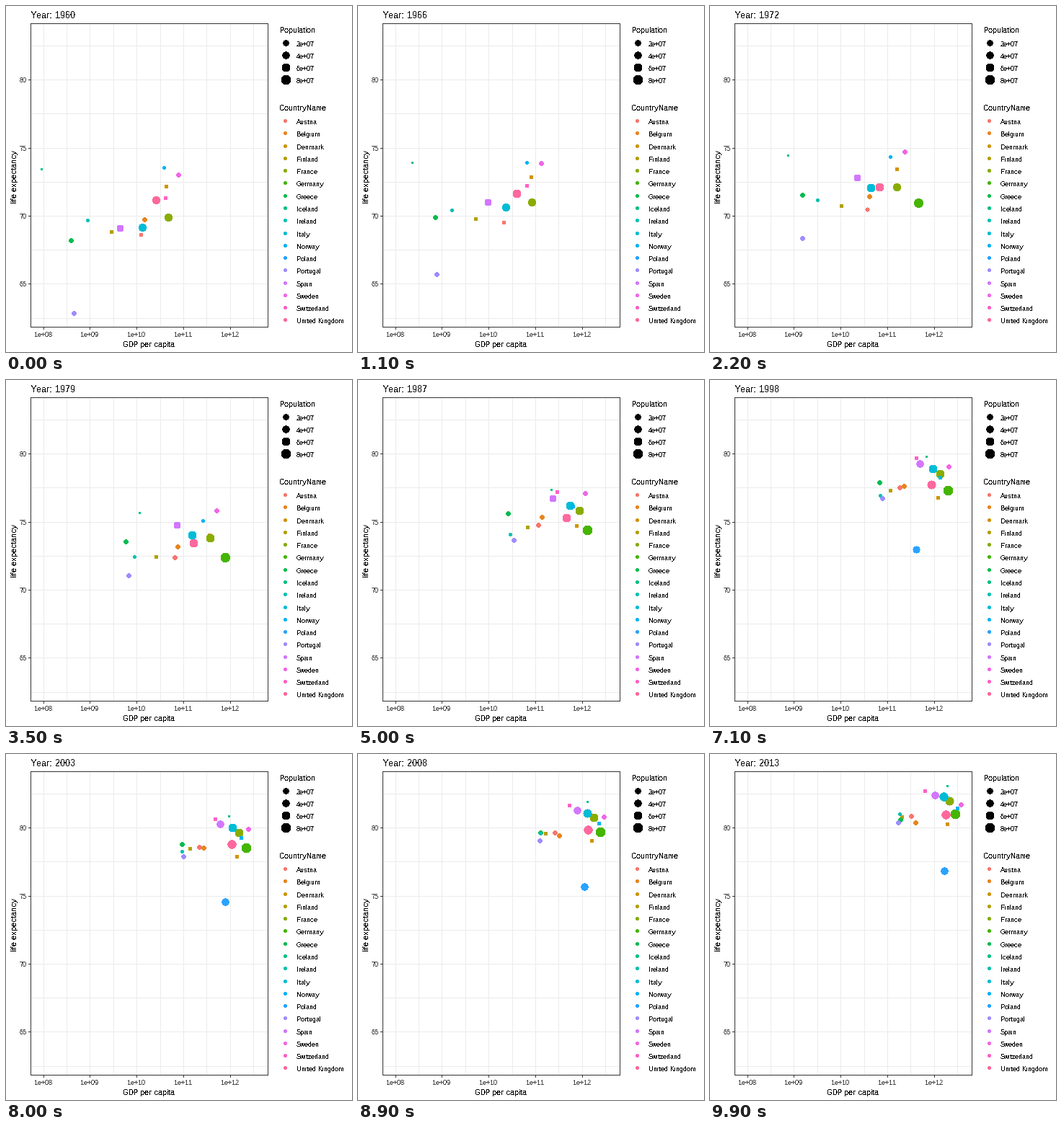
These frames come from a looping animation (480 by 480 pixels, 10000 ms). A matplotlib script:

```python
import numpy as np
import matplotlib.pyplot as plt
from matplotlib.animation import FuncAnimation
from matplotlib.patches import Circle, Rectangle

plt.rcParams.update({
    "font.family": "Liberation Sans",
    "text.hinting": "native",
    "text.hinting_factor": 1,
    "text.antialiased": False,
})

STAGE, DPI = 480, 80
FRAMES, INTERVAL = 100, 100
FIRST, LAST = 1960, 2013
STOPS = np.array([0, 22, 50, 99]) / 99  # when a path passes its waypoints
LEFT, TOP, RIGHT, BOTTOM = 34, 24, 363, 445
GRID, DARK, GREY = "#EBEBEB", "#333333", "#4D4D4D"

fig = plt.figure(figsize=(STAGE / DPI, STAGE / DPI), dpi=DPI, facecolor="white")
ax = fig.add_axes([0, 0, 1, 1])
ax.set_xlim(0, STAGE)
ax.set_ylim(STAGE, 0)
ax.axis("off")


def hcl(hue, chroma=100, lum=65):
    """Polar LUV colour to clipped sRGB."""
    h = np.radians(hue)
    y = ((lum + 16) / 116) ** 3
    u = chroma * np.cos(h) / (13 * lum) + 0.1978398
    v = chroma * np.sin(h) / (13 * lum) + 0.4683363
    x = 9 * y * u / (4 * v)
    z = -x / 3 - 5 * y + 3 * y / v
    rgb = np.clip([3.240479 * x - 1.537150 * y - 0.498535 * z,
                   -0.969256 * x + 1.875992 * y + 0.041556 * z,
                   0.055648 * x - 0.204043 * y + 1.057311 * z], 0, 1)
    return tuple(np.where(rgb > 0.00304, 1.055 * rgb ** (1 / 2.4) - 0.055, 12.92 * rgb))


def label(x, y, s, px, color="black", **kw):
    return ax.text(x, y, s, fontsize=px * 72 / DPI, color=color, zorder=8, **kw)


def bar(x, y, w, h, color, z=1):
    ax.add_patch(Rectangle((x, y), w, h, facecolor=color, lw=0,
                           antialiased=False, zorder=z))


def pixel(x, y):
    return np.floor(x) + 0.5, np.floor(y) + 0.5


def dot(x, y, r, color):
    return ax.add_patch(Circle(pixel(x, y), r, facecolor=color, lw=0,
                               antialiased=False, zorder=4))


def pop_radius(millions):
    """Dot area grows with population."""
    size = 1 + 5 * np.sqrt(np.clip(millions / 82.5, 0, 1))
    return np.maximum(0.375 * (size * 2.845 + 0.945) - 0.5, 1.1)


def smooth(t, p, at):
    """Monotone cubic through the points (t, p)."""
    h, s = np.diff(t), np.diff(p) / np.diff(t)
    a, b = 2 * h[1:] + h[:-1], h[1:] + 2 * h[:-1]
    same = s[:-1] * s[1:] > 0
    inner = np.zeros(len(same))
    inner[same] = (a + b)[same] / (a[same] / s[:-1][same] + b[same] / s[1:][same])
    m = np.concatenate([s[:1], inner, s[-1:]])
    i = np.clip(np.searchsorted(t, at, side="right") - 1, 0, len(s) - 1)
    q = np.clip((at - t[i]) / h[i], 0, 1)
    return (p[i] + (p[i + 1] - p[i]) * q * q * (3 - 2 * q)
            + q * (1 - q) * h[i] * ((1 - q) * m[i] - q * m[i + 1]))


def frame_of(year):
    return round((year - FIRST) * (FRAMES - 1) / (LAST - FIRST))


# Panel, grid and axes
for i in range(10):
    x = int(52 + 32.4 * i)
    bar(x, TOP, 1, BOTTOM - TOP, GRID)
    if i % 2 == 0:
        bar(x, BOTTOM, 1, 4, DARK)
        label(x, 459, f"1e+{8 + i // 2:02d}", 9, GREY, ha="center")
for i in range(9):
    y = int(55.4 + 47.2 * i)
    bar(LEFT, y, RIGHT - LEFT, 1, GRID)
    if i % 2:
        bar(LEFT - 3, y, 3, 1, DARK)
        label(29, y + 4, str(80 - 5 * (i // 2)), 9, GREY, ha="right")
for x in (LEFT, RIGHT):
    bar(x, TOP, 1, BOTTOM - TOP + 1, DARK, 6)
for y in (TOP, BOTTOM):
    bar(LEFT, y, RIGHT - LEFT + 1, 1, DARK, 6)
label(198, 473, "GDP per capita", 11, ha="center")
label(12, 236.5, "life expectancy", 11, rotation=90, ha="center", va="center")
title = label(34, 17, "", 13)

# Size legend
label(380, 37, "Population", 11)
for i in range(1, 5):
    y = 33.7 + 17.3 * i
    dot(388, y, pop_radius(20 * i), "black")
    label(403, y + 4.5, f"{2 * i}e+07", 9)

label(380, 145, "CountryName", 11)
tracks = []


def track(name, pop, *path, since=FIRST, gap=()):
    """Legend entry and moving dot; the path gives four waypoints."""
    n = len(tracks)
    color = hcl(15 + 360 * n / 17)
    y = 159.5 + 17.28 * n
    dot(387.5, y, 2.1, color)
    label(403, y + 4.5, name, 9)

    frames, start = np.arange(FRAMES), frame_of(since)
    stops = start + (FRAMES - 1 - start) * STOPS
    xs, ys = (smooth(stops, np.array(p, float), frames) for p in zip(*path))
    radii = pop_radius(pop * (1 + 0.25 * frames / FRAMES))
    shown = [i >= start and i not in gap for i in frames]
    tracks.append((dot(0, 0, 1, color), xs, ys, radii, shown))


track("Austria", 7, (187, 317), (218, 282), (250, 201), (279, 86))
track("Belgium", 9, (192, 296), (221, 264), (255, 190), (285, 95))
track("Denmark", 4.6, (222, 250), (259, 226), (303, 202), (329, 97))
track("Finland", 4.4, (146, 313), (182, 277), (235, 204), (266, 87))
track("France", 49, (225, 293), (259, 251), (307, 181), (332, 65))
track("Germany", 72, (286, 279), (306, 243), (325, 183), (340, 83), since=1970)
track("Greece", 8.5, (90, 325), (128, 262), (208, 185), (264, 91))
track("Iceland", 0.2, (49, 226), (108, 207), (268, 152), (329, 44))
track("Ireland", 3, (113, 297), (149, 269), (211, 214), (263, 83))
track("Italy", 50, (189, 307), (223, 252), (294, 174), (324, 59))
track("Norway", 3.8, (219, 224), (250, 209), (298, 175), (343, 75))
track("Poland", 32, (231, 275), (270, 254), (301, 212), (325, 162), since=1990)
track("Portugal", 8.8, (94, 426), (128, 322), (216, 222), (261, 95))
track("Spain", 33, (158, 308), (204, 238), (270, 164), (312, 57))
track("Sweden", 7.6, (239, 234), (270, 202), (315, 157), (348, 70))
track("Switzerland", 5.8, (221, 266), (247, 230), (276, 155), (298, 51),
      gap=range(frame_of(1969) + 1, frame_of(1980)))
track("United Kingdom", 52, (208, 269), (235, 251), (289, 191), (327, 84))


def draw(i):
    title.set_text(f"Year: {round(FIRST + (LAST - FIRST) * i / (FRAMES - 1))}")
    for c, xs, ys, radii, shown in tracks:
        c.set_visible(shown[i])
        c.set_center(pixel(xs[i] + 0.01, ys[i] + 0.01))
        c.set_radius(radii[i])
    return [title] + [t[0] for t in tracks]


anim = FuncAnimation(fig, draw, frames=FRAMES, interval=INTERVAL,
                     repeat=True, repeat_delay=0, blit=False)
plt.show()
```
